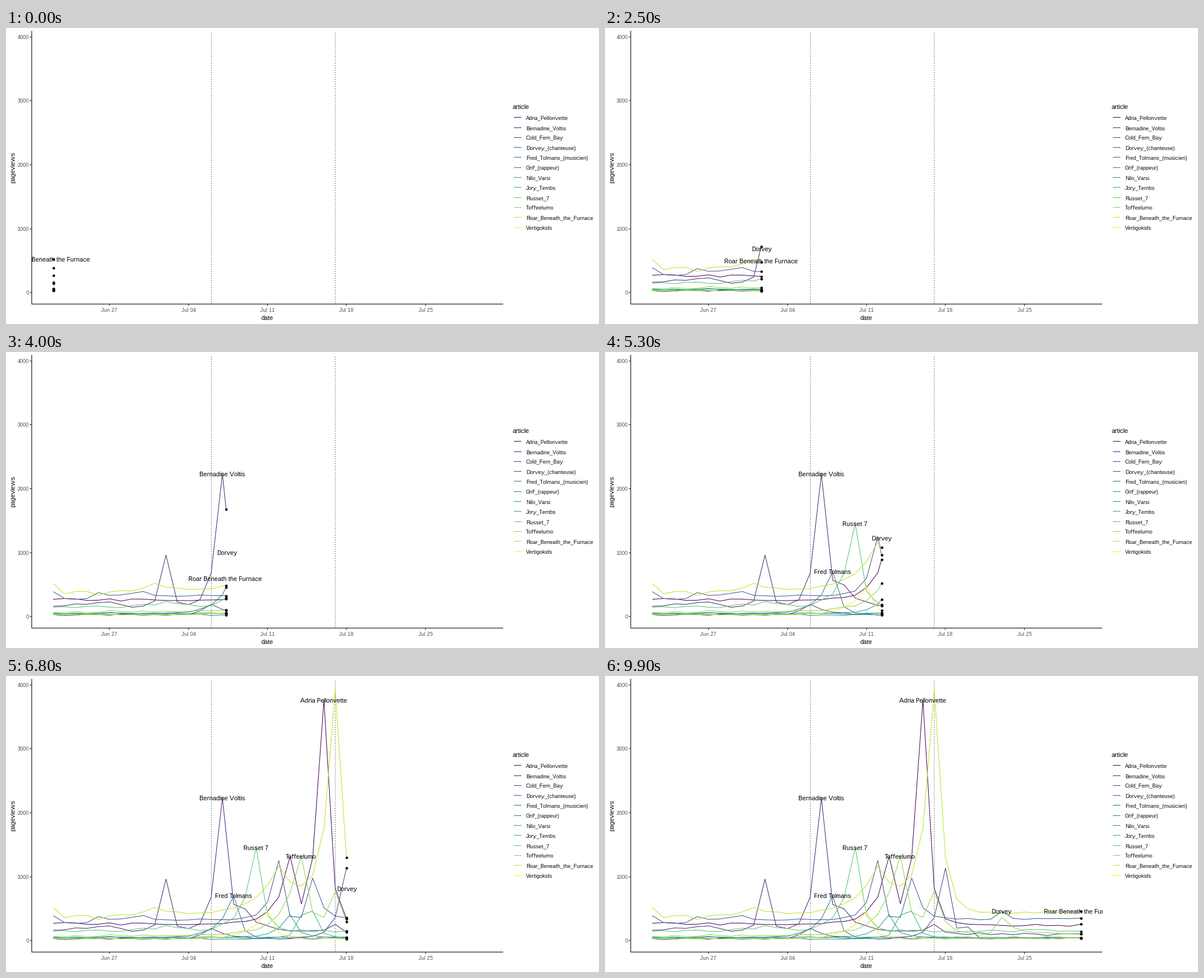
These frames come from a looping animation (1024 by 512 pixels, 10000 ms). A matplotlib script:

```python
import numpy as np
import matplotlib.pyplot as plt
from matplotlib.animation import FuncAnimation
from matplotlib.patches import Rectangle

plt.rcParams["font.family"] = "Liberation Sans"
plt.rcParams["text.hinting"] = "native"
plt.rcParams["text.hinting_factor"] = 1

W, H, DPI = 1024, 512, 72          # at 72 dpi one point is one pixel
FRAMES, STEP_MS = 100, 100
LAST = 38                          # days after Jun 22
LEFT, RIGHT, TOP, BOTTOM = 44.5, 858.5, 5.5, 477.5
TEXT_H = 9                         # height used for the label overlap test

DAYS = np.arange(LAST + 1)
# each day is reached on a whole frame
DAY_FRAMES = np.array([round(d * (FRAMES - 1) / LAST) for d in DAYS])
rng = np.random.default_rng(7)


def px(day):
    return 81.5 + 19.48 * np.asarray(day, float)


def py(views):
    return 457.9 - 0.1107 * np.asarray(views, float)


def peak(day, height, rise=0.0, fall=0.0):
    """A spike that grows and fades by a constant ratio per day."""
    gap = DAYS - day
    return height * np.where(gap < 0, rise, fall) ** np.abs(gap)


def trend(start, end, wobble, *peaks):
    """Daily views: a slow drift, small noise and a few spikes."""
    noise = rng.uniform(-wobble, wobble, len(DAYS))
    return np.maximum(np.linspace(start, end, len(DAYS)) + noise + sum(peaks), 15)


series = {
    "Adria_Pellonvette": trend(
        268, 245, 20, peak(21, 980, 0.42), peak(24, 3525, 0.3, 0.16)),
    "Bernadine_Voltis": trend(
        165, 90, 20, peak(5, 70, 0.7, 0.4), peak(10, 800, 0.12, 0.1),
        peak(15, 2100, 0.26, 0.2), peak(17, 270, 0.1, 0.55), peak(25, 140, 0.4, 0.2)),
    "Cold_Fern_Bay": trend(
        30, 40, 12, peak(14, 160, 0.3, 0.5), peak(26, 1090, 0.3, 0.15), peak(28, 150)),
    "Dorvey_(chanteuse)": trend(
        322, 342, 12, peak(0, 100), peak(2, -60, 0.6, 0.5), peak(4, 60),
        peak(8, 75, 0.5, 0.2), peak(20, 920, 0.28, 0.05), peak(23, 640, 0.03, 0.28),
        peak(31, 118)),
    "Fred_Tolmans_(musicien)": trend(50, 45, 14, peak(16, 650, 0.45, 0.18)),
    "Grif_(rappeur)": trend(28, 35, 10),
    "Nilo_Varsi": trend(55, 50, 14, peak(21, 355, 0.42, 0.24)),
    "Jory_Tembs": trend(50, 45, 14, peak(22, 340, 0.1), peak(23, 405, 0, 0.15)),
    "Russet_7": trend(
        145, 158, 20, peak(10, 80, 0.6, 0.5), peak(18, 1300, 0.41, 0.19)),
    "Toffeelumo": trend(
        80, 95, 20, peak(22, 1205, 0.53, 0.27), peak(25, 670, 0.25, 0.3),
        peak(31, 270, 0.15, 0.5)),
    "Roar_Beneath_the_Furnace": trend(
        385, 450, 12, peak(0, 130), peak(1, -35), peak(4, -55), peak(9, 115, 0.35, 0.5),
        peak(20, 720, 0.6, 0.6), peak(25, 3440, 0.36, 0.24), peak(31, -25)),
    "Vertigokids": trend(32, 36, 8, peak(19, 430, 0.5, 0.2)),
}
views = np.array(list(series.values()))
leaders = views.argmax(axis=0)
colors = plt.cm.viridis(np.linspace(0, 1, len(series)))

fig = plt.figure(figsize=(W / DPI, H / DPI), dpi=DPI, facecolor="white")
ax = fig.add_axes([0, 0, 1, 1])
ax.set_xlim(0, W)
ax.set_ylim(H, 0)
ax.axis("off")
panel = Rectangle((LEFT, TOP), RIGHT - LEFT, BOTTOM - TOP, transform=ax.transData)


def crisp(v):
    """Centre of the pixel that holds v."""
    return np.floor(v) + 0.5


def stroke(xs, ys, color="black", **kw):
    return ax.plot(xs, ys, color=color, lw=1, snap=False,
                   solid_capstyle="butt", **kw)[0]


def text(x, y, s, size, color="black", ha="left", **kw):
    kw.setdefault("va", "baseline")
    return ax.text(x, y, s, fontsize=size, color=color, ha=ha, **kw)


# axes
stroke([LEFT, LEFT], [TOP - 0.5, BOTTOM + 0.5])
stroke([LEFT, RIGHT], [BOTTOM, BOTTOM])
for v in range(0, 4001, 1000):
    y = crisp(py(v))
    stroke([LEFT - 3.5, LEFT - 0.5], [y, y], "#333333")
    text(39.5, y + 3.5, str(v), 8.8, "#4d4d4d", "right")
for i, name in enumerate(["Jun 27", "Jul 04", "Jul 11", "Jul 18", "Jul 25"]):
    x = crisp(px(5 + 7 * i))
    stroke([x, x], [BOTTOM + 0.5, BOTTOM + 3.5], "#333333")
    text(x, 491, name, 8.8, "#4d4d4d", "center")
text(451, 505, "date", 11, ha="center")
text(12, 241.5, "pageviews", 11, ha="center", va="center", rotation=90)
for day in (14, 25):
    x = crisp(px(day))
    stroke([x, x], [BOTTOM, 8], ls=(0, (1, 3)), dash_capstyle="butt")

# legend
text(875, 140, "article", 11)
for i, article in enumerate(series):
    y = 154.7 + 17.3 * i
    stroke([877, 890], [crisp(y)] * 2, colors[i])
    text(898, y + 4, article, 8.8)

# moving parts
lines = [stroke([], [], c, zorder=3) for c in colors]
dots = ax.plot([], [], "o", color="black", ms=4.4, mew=0, zorder=4)[0]

labels = []
for i, (article, values) in enumerate(series.items()):
    days = np.flatnonzero(leaders == i)
    if len(days):
        name = article.split("_(")[0].replace("_", " ")
        t = text(0, 0, name, 11, ha="center", zorder=5)
        t.set_clip_path(panel)
        t.set_clip_on(True)
        width = t.get_window_extent(fig.canvas.get_renderer()).width
        labels.append((t, width, DAY_FRAMES[days], px(days), py(values[days])))


def place_labels(k):
    """Slide each label between the days it leads; drop those that overlap."""
    shown = []
    for t, width, keys, xs, ys in labels:
        x, y = np.interp(k, keys, xs), np.interp(k, keys, ys)
        free = all(abs(x - ox) >= (width + ow) / 2 or abs(y - oy) >= TEXT_H
                   for ox, oy, ow in shown)
        visible = bool(k >= keys[0] and free)
        t.set_visible(visible)
        if visible:
            t.set_position((x - 0.5, y + 4))
            shown.append((x, y, width))


def draw(k):
    head = np.interp(k, DAY_FRAMES, DAYS)
    past = DAYS[DAYS < head]
    days = np.append(past, head)
    tips = []
    for line, values in zip(lines, views):
        tip = np.interp(head, DAYS, values)
        line.set_data(px(days), py(np.append(values[past], tip)))
        tips.append(tip)
    dots.set_data(np.full(len(tips), px(head)), py(tips))
    place_labels(k)
    return [*lines, dots, *(entry[0] for entry in labels)]


anim = FuncAnimation(fig, draw, frames=FRAMES, interval=STEP_MS,
                     init_func=lambda: draw(0), repeat=True, repeat_delay=0,
                     blit=False)
plt.show()
```
